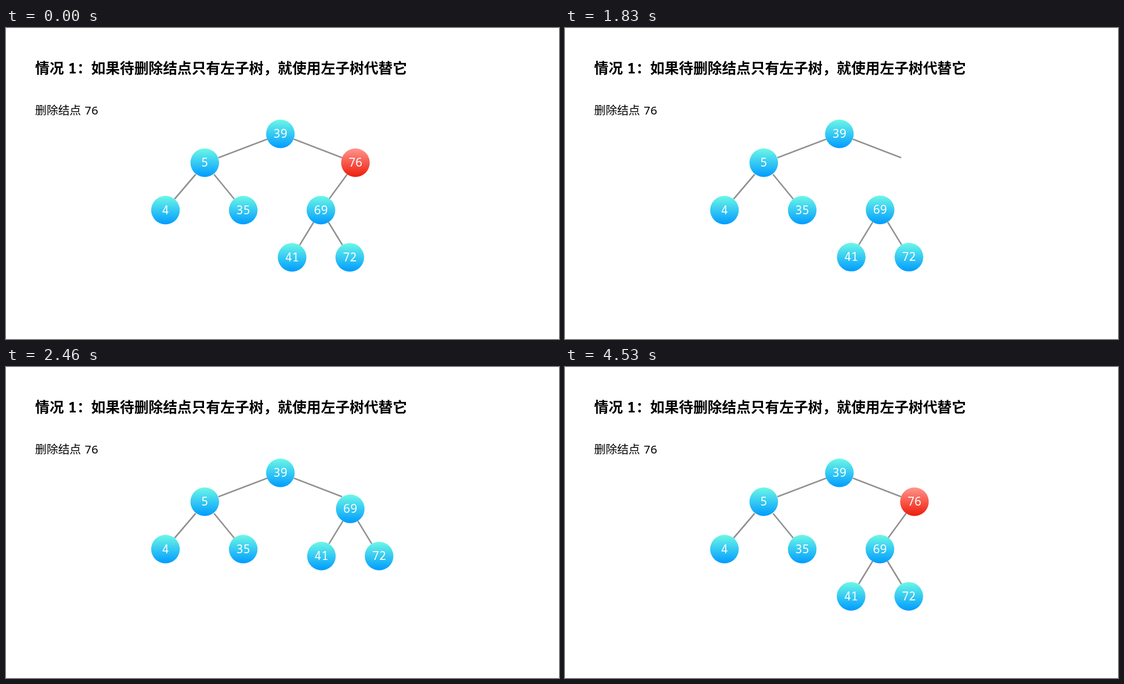
Animation, 997 px wide and 561 px high, one loop 4.56 s. Source, as an HTML page:

```html
<!DOCTYPE html>
<html lang="zh-CN">
<head>
<meta charset="utf-8">
<style>
html, body { margin: 0; width: 100%; height: 100%; overflow: hidden; background: #fff; }
svg { display: block; }
text { font-family: "Noto Sans CJK SC", "Noto Sans CJK", sans-serif; }
.num { font-family: "Noto Sans Mono", "DejaVu Sans", monospace; }
.title { font-size: 25.9px; font-weight: 700; }
.sub { font-size: 20.7px; }
.node { font-size: 21px; font-weight: 500; fill: #fff; text-anchor: middle; }
line { stroke: #919191; stroke-width: 2.7; }
</style>
</head>
<body>
<svg width="997" height="561" viewBox="0 0 997 561">
  <defs>
    <linearGradient id="blue" x2="0" y2="1"><stop stop-color="#6cf8e6"/><stop offset="1" stop-color="#009bff"/></linearGradient>
    <linearGradient id="red" x2="0" y2="1"><stop stop-color="#ff958d"/><stop offset="1" stop-color="#ee1c0a"/></linearGradient>
  </defs>
  <text class="title" y="82"><tspan x="52.5">情况</tspan><tspan class="num" x="112">1</tspan><tspan x="128">：</tspan><tspan x="153.5">如果待删除结点只有左子树，就使用左子树代替它</tspan></text>
  <text class="sub" y="156"><tspan x="52.5">删除结点</tspan><tspan class="num" x="141.5">76</tspan></text>
  <g id="tree"></g>
  <g id="link"></g>
  <g id="removed"></g>
  <g id="subtree"></g>
</svg>
<script>
const LOOP = 4560, STEP = 30;
const get = id => document.getElementById(id);
const tree = get('tree'), link = get('link'), removed = get('removed'), subtree = get('subtree');

const line = (x1, y1, x2, y2) => `<line x1="${x1}" y1="${y1}" x2="${x2}" y2="${y2}"/>`;
const node = (x, y, label, fill = 'blue') =>
  `<circle cx="${x}" cy="${y}" r="25.8" fill="url(#${fill})"/>` +
  `<text class="node num" x="${x}" y="${y + 7}">${label}</text>`;

tree.innerHTML =
  line(471, 200.5, 383, 234) + line(519, 200.5, 606, 234) +
  line(342, 264, 304, 308.5) + line(375, 264, 411.5, 308.5) +
  node(494.7, 191, 39) + node(358.3, 243, 5) + node(287.5, 328.5, 4) + node(427.7, 328.5, 35);
link.innerHTML = line(615, 264, 582.5, 308.5);
removed.innerHTML = node(630, 243, 76, 'red');
subtree.innerHTML =
  line(554.5, 350.5, 529.5, 391.5) + line(581.5, 350.5, 606.5, 391.5) +
  node(567.8, 328.5, 69) + node(515.8, 413.7, 41) + node(619.8, 413.7, 72);

// One-second ease in and out, beginning at `start`.
function ease(t, start) {
  const u = Math.min(1, Math.max(0, (t - start) / 1000));
  return u ** 3 * (10 - 15 * u + 6 * u * u);
}
const fade = (el, p, end) => el.setAttribute('opacity', Math.max(0, 1 - p / end));
const move = (el, x, y) => el.setAttribute('transform', `translate(${x} ${y})`);

function draw(now) {
  let t = Math.floor(now % LOOP / STEP) * STEP;
  if (t >= LOOP - STEP) t = 0;
  const out = ease(t, 500), up = ease(t, 1750);
  move(removed, 216 * out, 0);
  fade(removed, out, 0.75);
  fade(link, out, 0.48);
  move(subtree, 62.2 * up, -85.5 * up);
  requestAnimationFrame(draw);
}
draw(0);
</script>
</body>
</html>
```
